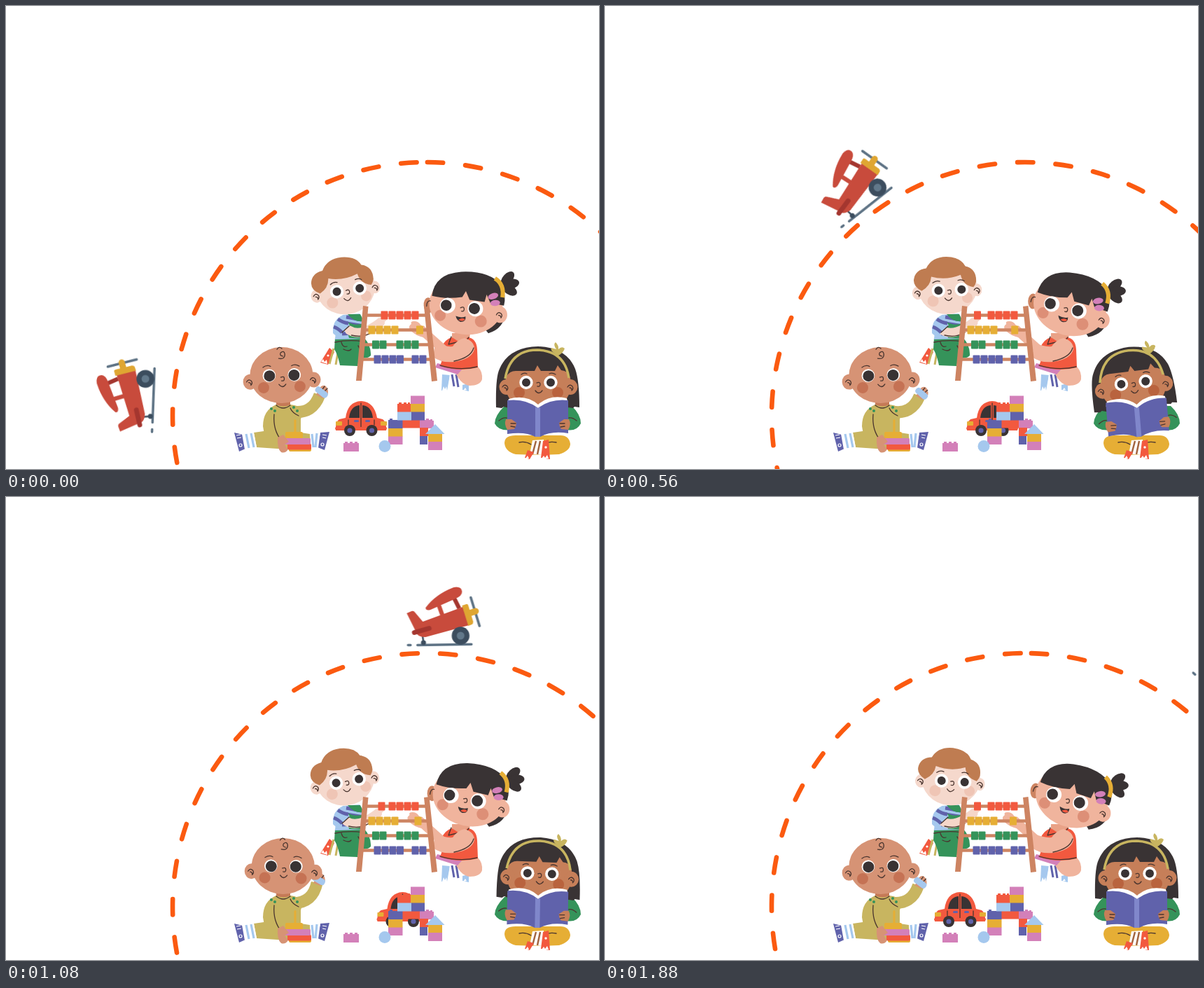
An HTML page for the animation above (1920 ms loop, 847 by 661 pixels).

```html
<!DOCTYPE html>
<html lang="en">
<head>
<meta charset="utf-8">
<title>Children playing</title>
<style>
html, body { margin: 0; width: 100%; height: 100%; overflow: hidden; background: #fff; }
svg { display: block; width: 847px; height: 661px; }

.red { fill: #f2593f } .yellow { fill: #e6ae35 } .green { fill: #35935a }
.purple { fill: #6062ab } .blue { fill: #a5c8ee } .pink { fill: #d380b9 }
.olive { fill: #c8b560 } .wood { fill: #cd8462 } .dark { fill: #393334 } .white { fill: #fff }
.plane-red { fill: #c84b3c } .steel { fill: #3c4d5e }
.line { fill: none; stroke: #4a352f; stroke-width: 1.3; stroke-linecap: round; stroke-linejoin: round }
.limb { fill: none; stroke-linejoin: round }

#ring, #plane, .move { animation: 1920ms linear infinite }
/* the ring turns in 25 fps steps, so its dashes seem to creep back */
#ring { fill: none; stroke: #fb5a10; stroke-width: 6.6; stroke-linecap: round;
  stroke-dasharray: 22.4 32.13; transform-origin: 600px 585px;
  animation-name: ring; animation-timing-function: steps(48); animation-delay: -4ms }
#plane { animation-name: fly }
#car { animation-name: drive }
#babyHead { transform-origin: 396px 575px; animation-name: baby }
#babyArm { transform-origin: 415px 580px; animation-name: wave }
#boyHead { transform-origin: 490px 445px; animation-name: boy }
.slideRed { animation-name: slideRed }
.slideYellow { animation-name: slideYellow }
#girlHead { transform-origin: 650px 480px; animation-name: girl }
#readerHead { transform-origin: 760px 585px; animation-name: reader }
#book { transform-origin: 760px 575px; animation-name: book }

@keyframes ring { from { rotate: .3deg } to { rotate: 369.1deg } }

/* polar flight around the ring centre: angle, radius, pitch */
@keyframes fly {
  0% { transform: translate(600px,585px) rotate(-82.6deg) translateY(-404.4px) rotate(-4.4deg) }
  18.75% { transform: translate(600px,585px) rotate(-52.5deg) translateY(-395.8px) rotate(-8deg) }
  29.17% { transform: translate(600px,585px) rotate(-33deg) translateY(-388px) rotate(-4.5deg) }
  39.58% { transform: translate(600px,585px) rotate(-10.4deg) translateY(-381.3px) rotate(-1deg) }
  45.83% { transform: translate(600px,585px) rotate(-2.5deg) translateY(-384.5px) rotate(-4deg) }
  56.25% { transform: translate(600px,585px) rotate(7.2deg) translateY(-390.1px) rotate(-7.2deg) }
  70.83% { transform: translate(600px,585px) rotate(25.4deg) translateY(-396.3px) rotate(-8.1deg) }
  81.25% { transform: translate(600px,585px) rotate(36.7deg) translateY(-410.2px) rotate(-5.2deg) }
  97.92% { transform: translate(600px,585px) rotate(46.1deg) translateY(-422px) rotate(-3deg) }
  100% { transform: translate(600px,585px) rotate(47.2deg) translateY(-424px) rotate(-3deg) }
}
@keyframes drive {
  0%, 97.92%, 100% { translate: 0 } 9.38% { translate: 2.5px } 18.75% { translate: 15.5px }
  29.17% { translate: 46px } 39.58% { translate: 61px } 47.92% { translate: 62px }
  56.25% { translate: 59.5px } 63.54% { translate: 53px } 70.83% { translate: 40px }
  81.25% { translate: 15.5px } 89.58% { translate: 3px }
}
@keyframes baby {
  0%, 97.92%, 100% { rotate: -2deg } 18.75% { rotate: -4deg } 39.58% { rotate: 0deg }
  56.25% { rotate: 1deg } 70.83% { rotate: .5deg } 81.25% { rotate: -.8deg }
}
@keyframes wave {
  0% { rotate: 0deg } 18.75% { rotate: 4deg } 39.58% { rotate: 2deg } 56.25%, 70.83% { rotate: -8deg }
  81.25% { rotate: -5deg } 97.92%, 100% { rotate: -1deg }
}
@keyframes boy {
  0% { rotate: -6.7deg } 18.75% { rotate: -2deg } 39.58% { rotate: 0deg } 56.25% { rotate: -8.1deg }
  70.83% { rotate: -9.4deg } 81.25% { rotate: -2.7deg } 97.92%, 100% { rotate: 5.4deg }
}
@keyframes slideRed {
  0% { translate: 10.5px } 18.75% { translate: 4px } 39.58% { translate: 0 } 56.25% { translate: 6.5px }
  70.83% { translate: 8.5px } 81.25% { translate: 5px } 97.92%, 100% { translate: 2px }
}
@keyframes slideYellow {
  0% { translate: 7px } 18.75% { translate: 2.5px } 39.58% { translate: 0 } 56.25% { translate: 4.5px }
  70.83% { translate: 6px } 81.25% { translate: 2.5px } 97.92%, 100% { translate: -1px }
}
@keyframes girl {
  0% { rotate: -5.6deg } 18.75% { rotate: 0deg } 39.58% { rotate: 4.4deg } 56.25% { rotate: -.4deg }
  70.83% { rotate: -1.5deg } 81.25% { rotate: 1.4deg } 97.92%, 100% { rotate: 5.4deg }
}
@keyframes reader {
  0%, 97.92%, 100% { rotate: 0deg } 18.75% { rotate: -6deg } 39.58% { rotate: -7.8deg }
  56.25% { rotate: 2.2deg } 70.83% { rotate: 4deg } 81.25% { rotate: .8deg }
}
@keyframes book {
  0%, 97.92%, 100% { rotate: 0deg } 18.75% { rotate: -4.5deg } 39.58% { rotate: -5deg }
  56.25% { rotate: 1deg } 70.83% { rotate: 2deg } 81.25% { rotate: .4deg }
}
</style>
</head>
<body>
<svg viewBox="0 0 847 661">
<defs>
  <path id="nose" class="line" d="M-3-3Q2-5 2-1Q2 3-2 2"/>
  <path id="smile" class="line" d="M-5-2Q0 5 5-2"/>
  <path id="ear" class="line" d="M-5-1Q-2-6 2-2Q4 1 1 4M-2 0Q1 0 1 3"/>
  <g id="eye"><circle class="white" r="9.7"/><circle class="dark" r="6"/></g>
  <rect id="bead" x="-5" y="-6" width="10" height="12" rx="1"/>
</defs>

<path id="ring" d="M600 223A362 362 0 0 1 600 947A362 362 0 0 1 600 223"/>

<!-- boy -->
<g>
  <path class="red" d="M462 488L469 494L460 512L449 509Z"/>
  <circle class="white" cx="460" cy="499" r="1.6"/>
  <path class="white" d="M450 508l3-4 2 4 3-3 1 6z"/>
  <path d="M468 489L462 511M475 489L471 512" fill="none" stroke="#c8b560" stroke-width="3"/>
  <path class="green" d="M470 474L511 473Q522 485 521 499Q517 504 505 502L502 514L477 513Q474 498 469 490Z"/>
  <path class="line" d="M470 480Q490 476 511 479M479 480Q481 488 487 486M505 502Q508 492 503 485M482 490Q490 494 493 490"/>
  <path class="blue" d="M481 441L505 439Q514 452 512 475L470 476Q470 456 481 441Z"/>
  <path d="M486 444L508 448M480 452L512 457M480 468L512 466" fill="none" stroke="#6062ab" stroke-width="5"/>
  <path class="green" d="M485 449Q497 458 511 453L513 475L490 474Q488 462 480 455Z"/>
  <path class="green" d="M488 440L506 440L511 450Q497 452 488 440Z"/>
  <g class="move slideRed">
    <path class="limb" d="M480 463Q496 473 524 452" stroke="#f5d6c9" stroke-width="13" stroke-linecap="round"/>
    <path class="line" d="M483 470Q500 474 512 466" stroke-width=".8"/>
    <path d="M520 446L531 443Q537 447 530 451L525 459Z" fill="#f5d6c9"/>
  </g>
  <path class="blue" d="M482 441Q466 447 467 467Q474 475 480 466L491 456Z"/>
  <path d="M474 447Q481 452 489 453M468 458Q474 460 480 466" fill="none" stroke="#6062ab" stroke-width="5"/>
  <path class="line" d="M480 466L490 457"/>
</g>
<g id="boyHead" class="move">
  <g fill="#f5d8cc">
    <ellipse cx="448" cy="409" rx="8.5" ry="9.5"/><ellipse cx="532" cy="406" rx="7" ry="9"/>
    <ellipse cx="490" cy="402" rx="42" ry="38"/>
  </g>
  <use href="#ear" x="448" y="410"/><use href="#ear" x="533" y="407"/>
  <path d="M453 406Q441 400 442 390Q444 376 460 374Q468 358 489 358Q510 359 516 372Q532 376 531 394Q530 399 527 402Q512 399 509 384Q488 392 467 386Q466 399 453 406Z" fill="#bf7c51"/>
  <g fill="#efc5b5"><circle cx="469" cy="421" r="8"/><circle cx="518" cy="417" r="7.5"/></g>
  <use href="#eye" x="477" y="406"/><use href="#eye" x="510" y="405"/>
  <path class="line" d="M469 395Q474 391 479 393M505 392Q510 390 514 393"/>
  <use href="#nose" x="493" y="409"/><use href="#smile" x="491" y="419"/>
</g>

<!-- girl at the abacus: body and arm, behind the frame -->
<g>
  <path class="blue" d="M623 526L634 527L630 549L622 549ZM652 541L661 539L661 550L652 548Z"/>
  <path class="white" d="M623 549l2-6 2 4 2-4 1 6zM653 549l3-4 2 3z"/>
  <path class="white" d="M634 524L650 526L648 546L632 545Z"/>
  <path d="M637 526L640 543M643 526L646 544" fill="none" stroke="#6062ab" stroke-width="3"/>
  <path d="M640 519L674 515Q681 522 680 533Q677 542 662 542Q648 540 640 519Z" fill="#f0b49d"/>
  <path class="pink" d="M616 510L652 518L645 526L613 516Z"/>
  <path d="M637 467L663 467L661 483L637 483Z" fill="#e9a287"/>
  <path class="red" d="M637 473Q626 476 622 488L623 505L620 514Q648 523 674 516L673 490Q672 475 660 473L648 480Z"/>
  <path class="line" d="M620 513Q648 521 673 515M636 472L632 483L648 479L651 486L661 473"/>
  <g class="move slideYellow">
    <path class="limb" d="M585 461L624 496" stroke="#f0b49d" stroke-width="13"/>
    <path d="M593 474Q577 471 570 462Q567 457 572 454Q570 450 576 450Q582 450 585 455L600 466Z" fill="#f0b49d"/>
  </g>
  <path d="M655 474Q669 478 669 490Q666 504 640 508Q622 510 610 501L613 481Q628 487 638 486Q645 476 655 474Z" fill="#f0b49d"/>
  <path class="line" d="M668 488Q664 502 640 507"/>
</g>

<!-- abacus -->
<g>
  <path d="M511 441.5H604M510 462.5H606M508 483.5H608M506 504.5H610" stroke="#cd8462" stroke-width="4.5"/>
  <g class="red">
    <use href="#bead" x="551.5" y="441.5"/><use href="#bead" x="562.5" y="441.5"/><use href="#bead" x="573.5" y="441.5"/><use href="#bead" x="584.5" y="441.5"/>
    <g class="move slideRed"><use href="#bead" x="530" y="441.5"/></g>
  </g>
  <g class="yellow">
    <use href="#bead" x="522.5" y="462.5"/><use href="#bead" x="533.5" y="462.5"/><use href="#bead" x="544.5" y="462.5"/><use href="#bead" x="555.5" y="462.5"/>
    <g class="move slideYellow"><use href="#bead" x="584" y="462.5"/></g>
  </g>
  <g class="green">
    <use href="#bead" x="528" y="483.5"/><use href="#bead" x="538.5" y="483.5"/>
    <use href="#bead" x="562.5" y="483.5"/><use href="#bead" x="573.5" y="483.5"/><use href="#bead" x="584.5" y="483.5"/>
  </g>
  <g class="purple">
    <use href="#bead" x="530.5" y="504.5"/><use href="#bead" x="541.5" y="504.5"/><use href="#bead" x="552.5" y="504.5"/><use href="#bead" x="563" y="504.5"/>
    <use href="#bead" x="584.5" y="504.5"/><use href="#bead" x="595.5" y="504.5"/>
  </g>
  <path class="wood" d="M510 428L517.5 429L508 535L500 535ZM597 429L604.5 428L616 535L608 536Z"/>
</g>

<g id="girlHead" class="move">
  <g class="dark">
    <path d="M706 408Q710 440 717 443Q714 466 690 471Q676 455 700 430Z"/>
    <ellipse cx="725" cy="396" rx="12" ry="7" transform="rotate(-42 725 396)"/>
    <ellipse cx="729" cy="404" rx="12" ry="7" transform="rotate(-5 729 404)"/>
    <ellipse cx="726" cy="412" rx="12" ry="7" transform="rotate(38 726 412)"/>
  </g>
  <g fill="#f0b49d">
    <ellipse cx="609" cy="423" rx="7" ry="11" fill="#cd8462"/>
    <ellipse cx="662" cy="428" rx="52.5" ry="42" transform="rotate(12 662 428)"/>
    <ellipse cx="709" cy="446" rx="10.5" ry="12"/>
  </g>
  <use href="#ear" x="709" y="447"/>
  <path class="line" d="M606 424Q607 416 612 417"/>
  <path class="dark" d="M615 410Q622 379 660 380Q700 382 716 405Q721 420 716 434L697 428L693 416L689 426L668 421L664 408L658 416Q634 417 615 410Z"/>
  <path d="M707 394Q720 404 715 422" fill="none" stroke="#e6ae35" stroke-width="6"/>
  <g class="pink"><ellipse cx="702" cy="419" rx="7.5" ry="4.3" transform="rotate(-12 702 419)"/><ellipse cx="704" cy="429" rx="7" ry="4.3"/></g>
  <g fill="#dd8f77"><circle cx="624" cy="439" r="8"/><circle cx="681" cy="453" r="8.5"/></g>
  <circle class="white" cx="636" cy="426" r="11"/><circle class="dark" cx="634" cy="425.5" r="7.8"/>
  <circle class="white" cx="675" cy="434.5" r="11"/><circle class="dark" cx="673.5" cy="434" r="8"/>
  <use href="#nose" x="657" y="434"/>
  <path class="dark" d="M646 442Q653 446 660 444Q660 452 652 451Q647 449 646 442Z"/>
  <path class="red" d="M649 448Q655 444 659 448Q656 452 649 448Z"/>
</g>

<!-- baby -->
<g>
  <path class="olive" d="M389 604L354 609L358 630L402 633L436 631L434 611Z"/>
  <g class="purple">
    <path d="M326 609L338 612L342 632L333 636Z"/><path d="M449 609L462 608L455 634L445 630Z"/>
  </g>
  <path class="white" d="M337 611L354 609L358 630L341 633ZM434 611L449 608L446 631L436 631Z"/>
  <path d="M343 611L347 631M350 610L354 630M437 611L439 630M444 610L442 630" fill="none" stroke="#a5c8ee" stroke-width="3.2"/>
  <g fill="none" stroke="#fff" stroke-width="1.2"><circle cx="335" cy="627" r="2"/><circle cx="452" cy="626" r="2"/><path d="M329 613l6-1M330 617l6-1M452 612l6 1M452 616l5 1"/></g>
  <g id="babyArm" class="move">
    <path class="limb" d="M410 579Q438 583 448 555" stroke="#c8b560" stroke-width="17"/>
    <path d="M443 555L449 544Q453 540 457 543Q462 549 459 556L452 560Z" fill="#d69375"/>
    <path class="line" d="M452 547L455 543M455 550L459 546"/>
    <rect class="blue" x="441" y="547" width="20" height="9" rx="4" transform="rotate(38 451 551)"/>
  </g>
  <path d="M386 562H406V575H386Z" fill="#c57a57"/>
  <path class="olive" d="M386 569Q397 574 406 569Q419 570 424 579L421 590V620L399 632Q370 628 367 600Q367 577 386 569Z"/>
  <path class="line" d="M383 583Q381 606 394 621M386 570Q396 578 406 570M406 574Q409 581 418 585"/>
  <g class="green"><circle cx="379" cy="575" r="2"/><circle cx="384" cy="578" r="2"/><circle cx="411" cy="573" r="2"/><circle cx="416" cy="578" r="2"/></g>
  <rect class="yellow" x="411.5" y="590" width="3" height="22" rx="1.5"/>
  <rect class="yellow" x="399" y="608" width="25" height="10" rx="2"/>
  <rect class="yellow" x="404" y="631" width="32" height="5" rx="2"/>
  <rect class="red" x="402" y="625" width="34" height="8.5" rx="2"/>
  <rect class="pink" x="396" y="617" width="39" height="9" rx="2"/>
  <path d="M388 616L396 612L404 622L398 626L403 633Q399 639 393 637Q387 632 388 616Z" fill="#d69375"/>
</g>
<g id="babyHead" class="move">
  <g fill="#d69375">
    <ellipse cx="350" cy="535" rx="10" ry="11"/><ellipse cx="441" cy="535" rx="10" ry="11"/>
    <ellipse cx="395" cy="527" rx="45" ry="40"/>
  </g>
  <use href="#ear" x="350" y="536"/><use href="#ear" x="441" y="536"/>
  <path class="line" d="M392 503Q401 505 401 497Q400 491 395 495Q393 499 398 500M390 490Q393 485 397 489"/>
  <g fill="#c57254"><circle cx="369" cy="544" r="8"/><circle cx="421" cy="544" r="8"/></g>
  <g class="white"><circle cx="377.5" cy="527" r="9.3"/><circle cx="413.5" cy="527" r="9.3"/></g>
  <g class="dark"><circle cx="378" cy="527.5" r="8"/><circle cx="413" cy="527.5" r="8"/></g>
  <path class="line" d="M369 515Q375 511 380 514M410 514Q415 511 421 515"/>
  <use href="#nose" x="397" y="533"/><use href="#smile" x="396" y="542"/>
</g>

<!-- car -->
<g id="car" class="move">
  <path class="red" d="M476 590L485 588Q488 565 507 564Q526 565 530 588L538 590Q544 594 543 606H471Q470 594 476 590Z"/>
  <path class="dark" d="M490 588Q492 571 505 570V588ZM509 570Q522 571 524 588H509Z"/>
  <path class="line" d="M507 567V604M489 591V598M526 591V598" stroke-width="1"/>
  <rect class="yellow" x="471" y="593" width="9" height="6" rx="1"/><rect class="yellow" x="535" y="593" width="9" height="6" rx="1"/>
  <rect class="purple" x="497" y="591" width="7" height="3" rx="1.5"/><rect class="purple" x="513" y="591" width="7" height="3" rx="1.5"/>
  <rect class="red" x="470" y="601" width="74" height="4" rx="2"/>
  <g class="dark"><circle cx="491" cy="606" r="8"/><circle cx="522.5" cy="606" r="8"/></g>
  <g class="purple"><circle cx="491" cy="606" r="3.6"/><circle cx="522.5" cy="606" r="3.6"/></g>
</g>

<!-- blocks -->
<g>
  <path class="pink" d="M578 556.5h20v12h-20zM591 591h2v-2h4v2h3v-2h4v2h2v-1h3v2h2v11h-20zM546 614h20.500v12h-20.500zM603 622h20v12h-20zM482 624h2v-2h4v2h3v-2h4v2h3v-2h4v2h2v12h-22z"/>
  <path class="red" d="M559 568h2v-2h4v2h3v-2h4v2h2v-2h3v2h2v12h-20zM566 591h25v11.500h-25zM591 602h12v12h-12z"/>
  <path class="yellow" d="M578 568h20v12h-20zM546 602.500h20.500v12h-20.500zM603 610h20v12h-20z"/>
  <path class="purple" d="M578 579.500h20v12h-20zM546 591h2v-2h4v2h14.500v12h-20.500zM591 614h11v12h-11z"/>
  <path class="blue" d="M559 579.500h20v12h-20zM613 597L626.500 611H599Z"/>
  <circle class="blue" cx="541" cy="628.500" r="8.500"/>
</g>

<!-- reader -->
<g>
  <path class="yellow" d="M728 613Q712 613 712 624Q713 636 728 640L757 641L765 641L790 640Q806 635 806 625Q804 612 790 613Z"/>
  <path class="line" d="M733 623Q742 621 750 626M786 623Q776 621 769 625"/>
  <path class="white" d="M752 620L768 619L768 641L748 640Z"/>
  <path d="M757 621L752 640M763 621L759 640" fill="none" stroke="#a3653f" stroke-width="2.500"/>
  <path class="red" d="M745 634L754 637L748 647L741 645ZM767 621L775 619L777 647L764 645Z"/>
  <path class="white" d="M742 646l3-4 2 4zM765 646l3-4 2 3 3-4 2 5z"/>
  <circle class="white" cx="771" cy="630" r="1.700"/>
</g>
<path class="green" d="M712 571Q698 585 698 596Q704 608 724 605L800 605Q815 608 821 596Q821 583 808 571Z"/>
<g id="readerHead" class="move">
  <path class="dark" d="M700 573Q699 530 705 518Q718 487 760 486Q801 488 813 518Q819 535 819 573L812 572L810 574L802 573L798 566H721L718 574L711 572L708 574Z"/>
  <g fill="#c67f59">
    <ellipse cx="760" cy="540" rx="47" ry="41"/>
    <ellipse cx="715" cy="544" rx="10.500" ry="11"/><ellipse cx="806" cy="544" rx="10.500" ry="11"/>
  </g>
  <use href="#ear" x="714" y="545"/><use href="#ear" x="807" y="545"/>
  <path class="dark" d="M715 529Q722 493 760 493Q798 494 805 529Q803 521 793 520L788 513L784 521H764L759 513L755 521H728Q719 521 715 529Z"/>
  <path d="M713 532Q720 491 759 491Q798 492 804 531" fill="none" stroke="#c8b560" stroke-width="3.500"/>
  <path class="olive" d="M784 496Q777 492 779 488L786 490Q781 483 785 480Q790 485 789 490Q794 485 798 489Q796 496 787 500Z"/>
  <g fill="#b9633e"><circle cx="733" cy="552" r="8"/><circle cx="788" cy="552" r="8"/></g>
  <use href="#eye" x="743" y="537.500"/><use href="#eye" x="778" y="537.500"/>
  <path class="line" d="M736 526Q740 523 744 525M776 525Q780 523 785 526"/>
  <use href="#nose" x="761" y="541"/><use href="#smile" x="761" y="551"/>
</g>
<g id="book" class="move">
  <path class="white" d="M718 561Q743 554 760 569Q777 554 801 560L803 568L760 580L716 568Z"/>
  <path class="purple" d="M716 563Q742 560 760 574Q778 560 803 563V610Q779 606 763 615H756Q741 607 716 611Z"/>
  <path d="M756 572Q760 576 763 572V615H756Z" fill="#8087cb"/>
  <path class="line" d="M704 592Q710 587 715 588M815 592Q809 587 804 588"/>
  <g fill="#c67f59">
    <path d="M714 590L722 590L729 595Q729 600 726 604L716 605Q711 597 714 590Z"/>
    <path d="M804 590L797 590L790 595Q790 600 793 604L803 605Q808 597 804 590Z"/>
  </g>
  <path class="line" d="M721 596L728 596M721 600L727 601M798 596L791 596M798 600L792 601" stroke-width=".8"/>
</g>

<!-- plane, wheel hub at the origin -->
<g id="plane">
  <path d="M-75 13.500H-71.500M-61.500 13.500L15.500 12.300M14.500-54.500L27-14" fill="none" stroke="#5d7284" stroke-width="3.600" stroke-linecap="round"/>
  <path d="M-55-4L-53 9" stroke="#3c4d5e" stroke-width="2.500"/>
  <circle class="steel" cx="-53" cy="10" r="3.600"/>
  <path d="M-31-43L-26-29" stroke="#c84b3c" stroke-width="6"/>
  <path d="M-9-53L-2-39" stroke="#a4362f" stroke-width="6"/>
  <path class="plane-red" d="M-77-32L-70-35Q-67-36-65-33L-54-20L3-41L12-15L-50 2Q-61 2-63-4Z"/>
  <path class="plane-red" d="M-50-40Q-36-59-10-69Q1-71 2-63Q2-57-7-53L-43-37Q-50-35-50-40Z"/>
  <path d="M-66-4.500L-45-10.500" stroke="#a4362f" stroke-width="7" stroke-linecap="round"/>
  <path d="M2-43L8-45Q10-46 11-43L18-20Q18-17 16-16L11-14Z" fill="#dfa632"/>
  <path d="M14-32.500L21.500-35" stroke="#dfa632" stroke-width="9" stroke-linecap="round"/>
  <circle class="steel" r="12.700"/><circle r="5.500" fill="#62788a"/>
</g>
</svg>
</body>
</html>
```
